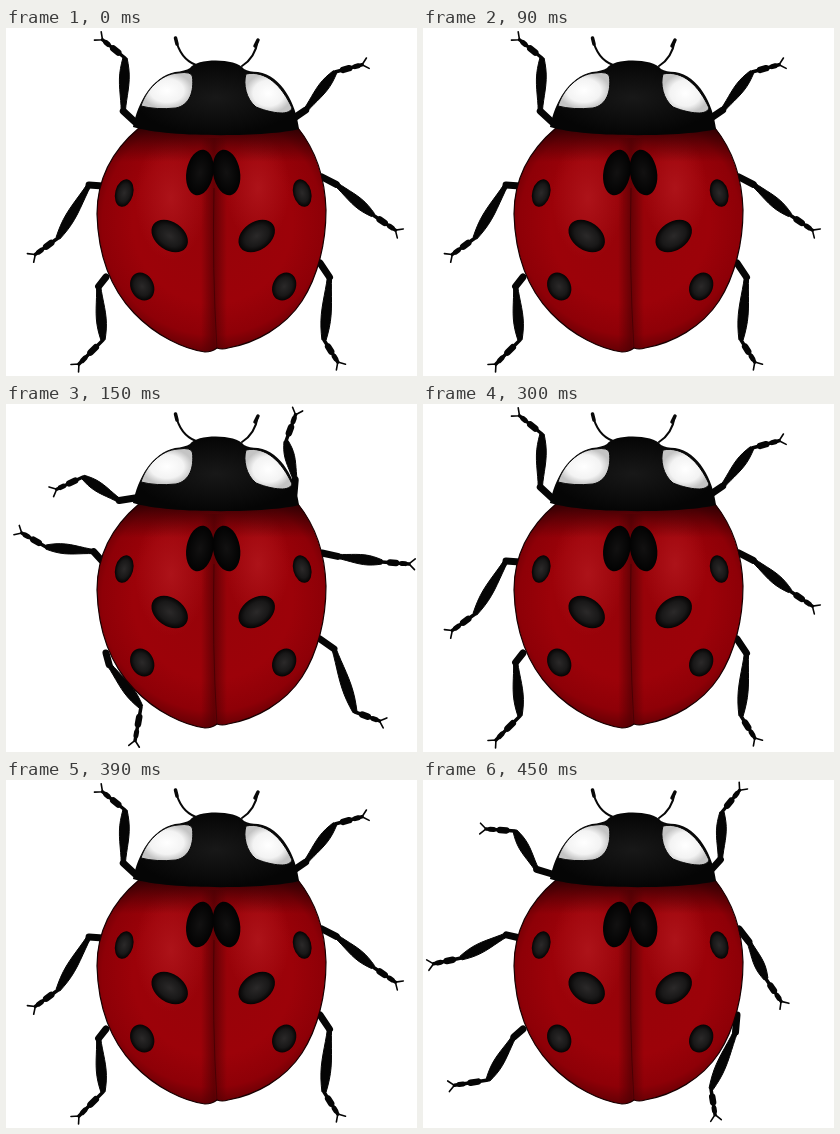
Recreate the animation shown at these times as an HTML page. Size 411 by 348 pixels, loop 0.6 s.

```html
<!DOCTYPE html>
<html lang="en">
<head>
<meta charset="utf-8">
<title>Ladybird</title>
<style>
  html, body { margin: 0; width: 100%; height: 100%; overflow: hidden; background: #fff; }
  svg { display: block; width: 100%; height: 100%; }
</style>
</head>
<body>
<svg viewBox="0 0 411 348" preserveAspectRatio="xMidYMid meet">
  <defs>
    <radialGradient id="shell" gradientUnits="userSpaceOnUse" cx="207" cy="196" r="132">
      <stop offset="0" stop-color="#960309"/>
      <stop offset=".6" stop-color="#9c0209"/>
      <stop offset=".84" stop-color="#8e0007"/>
      <stop offset="1" stop-color="#5c0004"/>
    </radialGradient>
    <linearGradient id="collar" x1="0" y1="0" x2="0" y2="1">
      <stop offset="0" stop-color="#250002" stop-opacity=".85"/>
      <stop offset="1" stop-color="#400003" stop-opacity="0"/>
    </linearGradient>
    <linearGradient id="seam">
      <stop offset="0" stop-color="#4a0003" stop-opacity="0"/>
      <stop offset=".5" stop-color="#4a0003" stop-opacity=".65"/>
      <stop offset="1" stop-color="#4a0003" stop-opacity="0"/>
    </linearGradient>
    <radialGradient id="shine">
      <stop offset="0" stop-color="#b51a20" stop-opacity=".7"/>
      <stop offset="1" stop-color="#b51a20" stop-opacity="0"/>
    </radialGradient>
    <radialGradient id="spot">
      <stop offset="0" stop-color="#2b2929"/>
      <stop offset=".65" stop-color="#191818"/>
      <stop offset="1" stop-color="#050303"/>
    </radialGradient>
    <radialGradient id="pair">
      <stop offset="0" stop-color="#121111"/>
      <stop offset="1" stop-color="#020202"/>
    </radialGradient>
    <radialGradient id="patch">
      <stop offset="0" stop-color="#fff"/>
      <stop offset=".65" stop-color="#f3f3f3"/>
      <stop offset="1" stop-color="#c4c4c4"/>
    </radialGradient>
    <radialGradient id="head">
      <stop offset="0" stop-color="#181818"/>
      <stop offset="1" stop-color="#050505"/>
    </radialGradient>
    <path id="back" d="M133 100C108 121 91 150 91 186C92 222 102 258 128 285C150 308 178 321 199 324Q206 324 211 320Q216 322 222 320C250 315 279 299 296 273C312 248 320 215 320 182C319 148 308 120 292 100Z"/>
    <clipPath id="inside"><use href="#back"/></clipPath>
  </defs>

  <g id="legs" fill="#050505" stroke="#050505" stroke-linecap="round" stroke-linejoin="round"></g>

  <use href="#back" fill="url(#shell)"/>
  <g clip-path="url(#inside)">
    <ellipse cx="165" cy="170" rx="36" ry="62" fill="url(#shine)"/>
    <ellipse cx="252" cy="160" rx="32" ry="55" fill="url(#shine)"/>
    <rect x="90" y="100" width="232" height="34" fill="url(#collar)"/>
    <rect x="195" y="110" width="26" height="215" fill="url(#seam)"/>
    <path d="M208 160Q206 240 211 322" fill="none" stroke="#4b0004"/>
  </g>
  <use href="#back" fill="none" stroke="#180002" stroke-width="1.2"/>
  <g id="spots"></g>

  <g fill="none" stroke="#080808" stroke-linecap="round">
    <path d="M190 37Q174 31 169.5 10M236 38Q249 30 252 12" stroke-width="2"/>
    <path d="M169.5 10L171 16M252 12L249 18" stroke-width="3.5"/>
  </g>
  <path d="M127 99C132 74 146 49 169 44Q179 43 184 40C191 30 230 30 238 41Q243 44 252 44C276 48 290 76 293 101C263 109 163 110 127 99Z" fill="url(#head)"/>
  <g fill="url(#patch)" stroke="#080808">
    <path d="M135 78C140 62 155 46 172 45Q186 43 186.5 49C188 63 184 77 170 80Q150 82 135 78Z"/>
    <path d="M240 46C260 42 276 58 286 80C283 89 262 84 250 79C240 71 237 56 240 46Z"/>
  </g>
</svg>
<script>
const STEP = 150, ORDER = [0, 1, 0, 2], AXIS = 207.2;

// root: hip position, hip and foot: lengths,
// poses: hip angle, ankle x and y, foot angle.
const LEGS = [
  { root: [129, 94], hip: 16, foot: 29, poses: [[-137, 119, 30, -141], [171, 77, 73, 155], [-163, 92, 51, -176]] },
  { root: [288, 90], hip: 14, foot: 28, poses: [[-34, 329, 44, -15], [-85, 280, 37, -70], [-48, 299, 32, -51]] },
  { root: [97, 158], hip: 14, foot: 28, poses: [[-176, 52, 210, 144], [-132, 40, 143, -150], [-167, 38, 178, 168]] },
  { root: [316, 149], hip: 16, foot: 27, poses: [[27, 367, 187, 34], [12, 376, 158, 4], [52, 343, 199, 56]] },
  { root: [100, 249], hip: 12, foot: 34, poses: [[128, 97, 312, 135], [75, 135, 303, 100], [139, 65, 300, 171]] },
  { root: [314, 235], hip: 17, foot: 26, poses: [[56, 318, 312, 58], [35, 349, 308, 20], [95, 288, 309, 81]] }
];

function make(parent, tag, attrs) {
  const el = document.createElementNS("http://www.w3.org/2000/svg", tag);
  for (const key in attrs) el.setAttribute(key, attrs[key]);
  return parent.appendChild(el);
}

function line(parent, width, ...points) {
  make(parent, "path", { d: "M" + points.join("L"), fill: "none", "stroke-width": width });
}

function polar([x, y], angle, length) {
  const a = angle * Math.PI / 180;
  return [x + Math.cos(a) * length, y + Math.sin(a) * length];
}

// Long leg part that swells towards the ankle.
function shin(parent, [x1, y1], [x2, y2]) {
  const len = Math.hypot(x2 - x1, y2 - y1);
  const ux = (x2 - x1) / len, uy = (y2 - y1) / len;
  const left = [], right = [];
  for (let i = 0; i <= 10; i++) {
    const t = i / 10, w = 2.1 + 2.8 * Math.sin(Math.PI * t ** 1.4);
    const x = x1 + ux * len * t, y = y1 + uy * len * t;
    left.push([x - uy * w, y + ux * w]);
    right.unshift([x + uy * w, y - ux * w]);
  }
  make(parent, "path", { d: "M" + left.concat(right).join("L") + "Z" });
}

function drawLeg(parent, { root, hip, foot }, [hipAngle, ax, ay, footAngle]) {
  const knee = polar(root, hipAngle, hip), ankle = [ax, ay];
  const along = part => polar(ankle, footAngle, foot * part);
  const toe = along(1);
  line(parent, 7, root, knee);
  shin(parent, knee, ankle);
  line(parent, 3.5, ankle, toe);
  line(parent, 6.5, along(.3), along(.52));
  line(parent, 5, along(.74), along(.86));
  line(parent, 1.6, polar(toe, footAngle - 42, 8), toe, polar(toe, footAngle + 42, 8));
}

const legs = document.getElementById("legs");
const groups = [0, 1, 2].map(i => {
  const g = make(legs, "g", {});
  LEGS.forEach(leg => drawLeg(g, leg, leg.poses[i]));
  return g;
});

// Spots come in mirrored pairs: distance from the axis, y, radii, tilt.
const spots = document.getElementById("spots");
[
  [13.3, 144.5, 13.5, 23, 10, "pair"],
  [89, 165, 9, 14, 15],
  [43.5, 208, 20, 14, 35],
  [71, 258.5, 11.5, 14.5, -26]
].forEach(([dx, y, rx, ry, tilt, fill = "spot"]) => {
  for (const side of [-1, 1]) make(spots, "ellipse", {
    rx, ry, fill: `url(#${fill})`,
    transform: `translate(${AXIS + side * dx} ${y}) rotate(${-side * tilt})`
  });
});

function show(time) {
  const pose = ORDER[Math.floor(time / STEP) % ORDER.length];
  groups.forEach((g, i) => g.setAttribute("display", i === pose ? "inline" : "none"));
}

const start = performance.now();
function tick() {
  show(performance.now() - start);
  requestAnimationFrame(tick);
}
tick();
</script>
</body>
</html>
```
